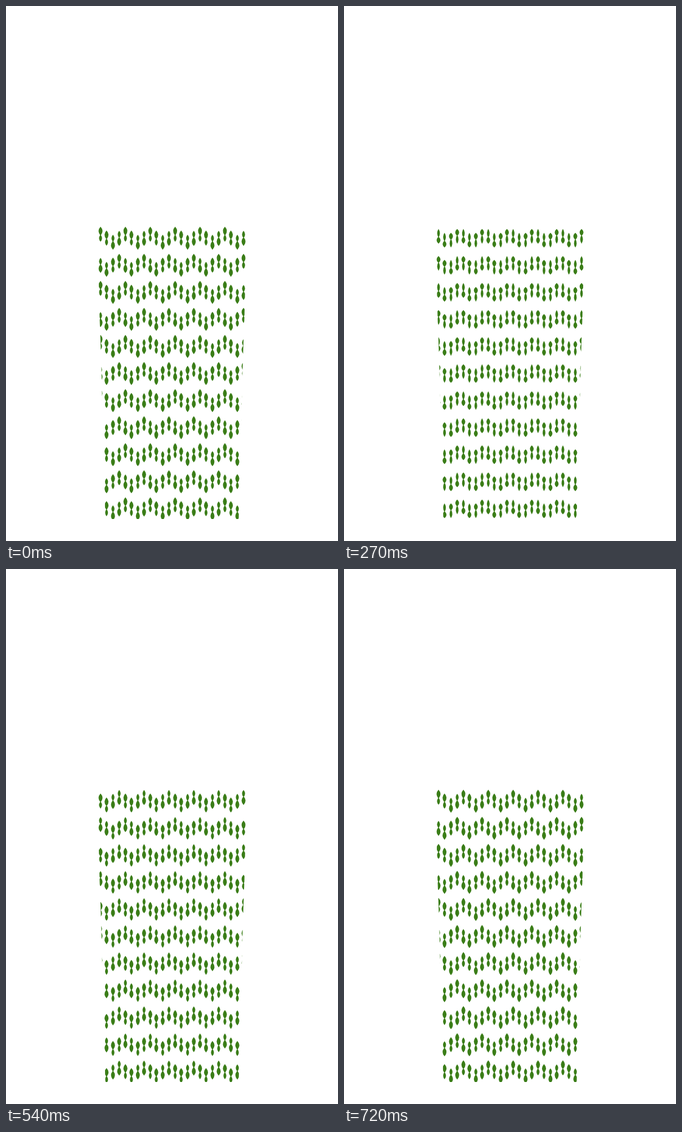
Animation, 590 px wide and 948 px high, one loop 0.75 s. Source, as an HTML page with a canvas:

```html
<!DOCTYPE html>
<html lang="en">
<head>
<meta charset="utf-8">
<title>Leaf wave</title>
<style>
  html, body { margin: 0; height: 100%; overflow: hidden; background: #fff; }
  canvas { display: block; }
</style>
</head>
<body>
<canvas id="stage" width="590" height="948"></canvas>
<script>
const ctx = document.getElementById('stage').getContext('2d');
const STEP = 30, STEPS = 25, COLS = 24, ROWS = 11;
const LEVEL = 6.85, LONG = 14.4, SHORT = 11.9, CENTER = 295;

// Left side of the tapering outline; the right side mirrors it.
const side = [[164, 390], [164.3, 470], [166.3, 550], [168, 596],
              [169.6, 645], [170.7, 690], [176.5, 909]];
const outline = new Path2D();
side.forEach(([x, y]) => outline.lineTo(x, y));
[...side].reverse().forEach(([x, y]) => outline.lineTo(2 * CENTER - x, y));

const mix = (a, b, k) => a + (b - a) * k;
const ease = k => (1 - Math.cos(Math.PI * Math.min(1, Math.max(0, k)))) / 2;

// Rises during one quarter of the cycle and falls again half a cycle later.
const swing = (step, start) => ease((step - start) / 6) - ease((step - start - 12) / 6);

// A lens from its outer tip to the narrow waist it shares with its partner.
function leaf(x, tip, waist, width) {
  ctx.beginPath();
  ctx.moveTo(x, tip);
  ctx.quadraticCurveTo(x - width, mix(tip, waist, 0.48), x - 0.7, waist);
  ctx.lineTo(x + 0.7, waist);
  ctx.quadraticCurveTo(x + width, mix(tip, waist, 0.48), x, tip);
  ctx.fill();
}

function draw(step) {
  const swap = swing(step, 0), shift = swing(step, 6);
  const longWidth = mix(6.7, 4.5, swap), shortWidth = mix(5, 6.6, swap);
  const stretch = mix(0.5, 0, swap);

  ctx.clearRect(0, 0, 590, 948);
  ctx.save();
  ctx.clip(outline);
  ctx.fillStyle = '#3a7d17';
  for (let row = 0; row < ROWS; row++) {
    for (let col = 0; col < COLS; col++) {
      const x = 168 + 11.05 * col - (col % 4 === 1 ? 0.4 : 0);
      const kind = row % 2 ? 3 - col % 4 : col % 4;
      const level = mix([0, 1, 2, 1][kind], [1, 2, 1, 0][kind], shift);
      const top = 391.5 + 47.95 * row + LEVEL * level;
      const bottom = top + LONG + SHORT;
      if (kind < 2) {
        leaf(x, top - stretch, top + LONG, longWidth);
        leaf(x, bottom, top + LONG, shortWidth);
      } else {
        leaf(x, top, top + SHORT, shortWidth);
        leaf(x, bottom + stretch, top + SHORT, longWidth);
      }
    }
  }
  ctx.restore();
}

function tick() {
  draw(Math.floor(performance.now() / STEP) % STEPS);
  requestAnimationFrame(tick);
}
tick();
</script>
</body>
</html>
```
